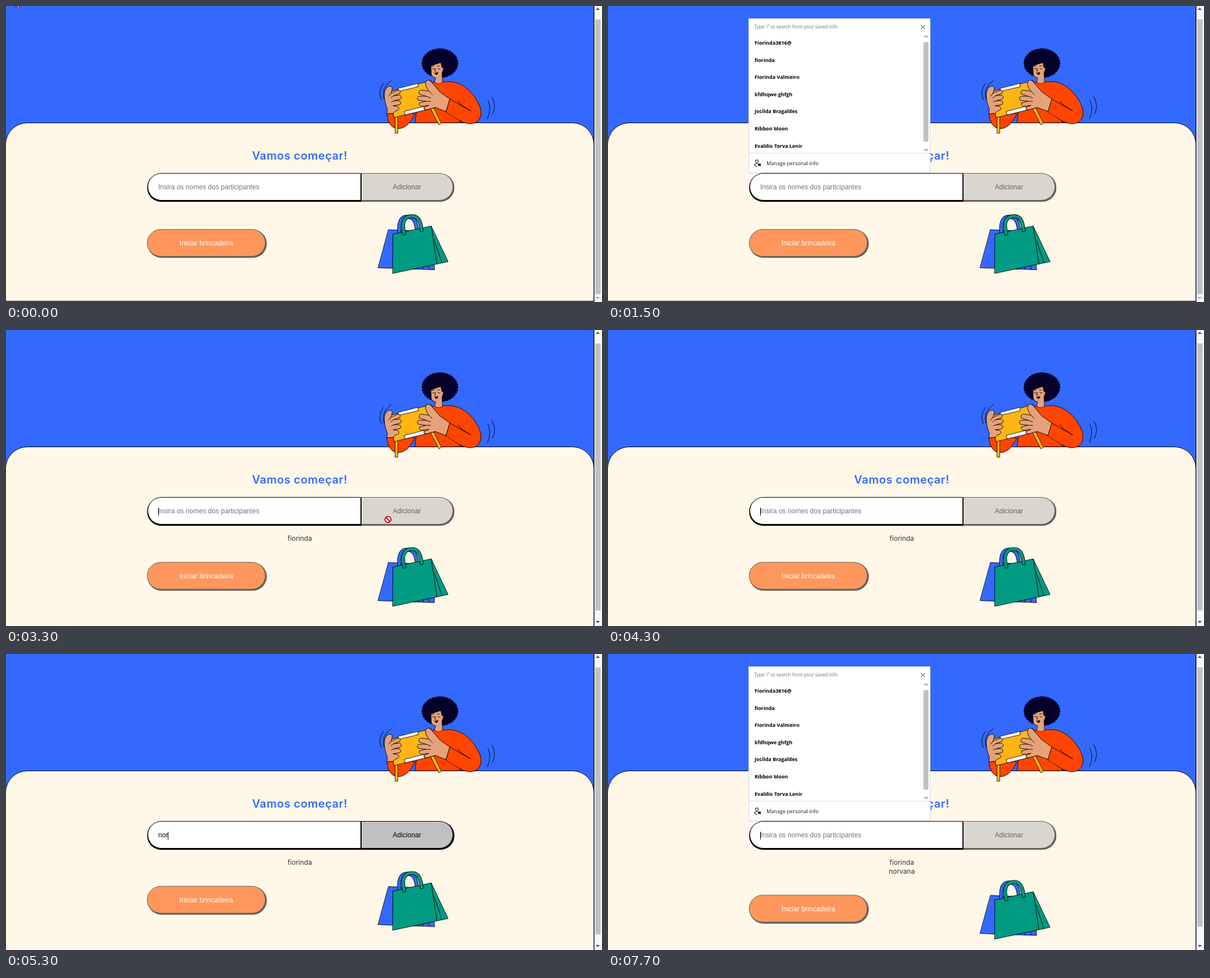
An HTML page for the animation above (8000 ms loop, 1061x528 px).

```html
<!DOCTYPE html>
<html lang="pt">
<head>
<meta charset="utf-8">
<style>
  html, body { margin: 0; width: 100%; height: 100%; overflow: hidden; }
  body { position: relative; font: 12.08px "Liberation Sans", Arial, sans-serif; }
  svg, div { position: absolute; box-sizing: border-box; }
  svg { left: 0; top: 0; }
  h1 { position: absolute; left: 0; top: 254.5px; width: 1046px; margin: 0; text-align: center;
       font: 600 20px/24px Inter, sans-serif; letter-spacing: .55px; color: #3469ff; }
  .field, .button { height: 49px; line-height: 48px; border: 1px solid #000; white-space: pre; }
  .field { left: 251.5px; top: 298px; width: 380.5px; padding-left: 18.5px; background: #fff;
           border-radius: 25px 0 0 25px; box-shadow: 0 1.5px 0 .8px #000; }
  .button { text-align: center; box-shadow: 1.5px 1.5px 0 .8px #000; }
  .off { opacity: .6; }
  #add { left: 632px; top: 298px; width: 163.5px; border-radius: 0 25px 25px 0; background: #c1c1c1; }
  #start { left: 251px; top: 398px; width: 211px; border-radius: 25px; background: #ff5800; color: #fff; }
  #caret { display: inline-block; width: 1px; height: 14px; margin-right: -1px; vertical-align: middle; background: #000; }
  #hint { color: #757575; }
  #names { left: 0; top: 363.5px; width: 1046px; text-align: center; white-space: pre;
           font: 12px/16px Inter, sans-serif; color: #333; }
  #popup { left: 250px; width: 324px; background: #fff; border: 1px solid #d3d7dd;
           font: 9.15px/20px "Open Sans", sans-serif; white-space: pre; color: #1b1b1b; }
  #popup div { left: 10px; }
  #popup .head { top: 4px; left: 9px; font-size: 8.4px; color: #707070; }
  #popup .item { font-size: 9px; font-weight: 700; color: #000; }
  #popup .foot { left: 0; bottom: 0; width: 322px; height: 35px; line-height: 35px; padding-left: 31px;
                 border-top: 1px solid #d3d7dd; background: #fff; }
</style>
</head>
<body>
<svg width="1061" height="528" fill="none" stroke="#000" stroke-linejoin="round" stroke-linecap="round">
  <rect width="1061" height="528" fill="#3469ff" stroke="none"/>
  <rect x="-.5" y="208.5" width="1047" height="600" rx="38" fill="#fff8e9"/>

  <g id="woman" stroke-width=".9">
    <path d="M672 138Q661 152 668 167M686 133Q667 146 673 166M858 168Q865 184 857 201M865 162Q874 178 866 193"/>
    <path fill="#ff4500" d="M728 208L733 170Q742 143 763 135Q771 140 778 135H794Q816 138 833 160Q849 182 845 197Q840 211 824 210Q816 209 808 205L810 208Z"/>
    <path d="M805 169L810 176L827 187M783 189L810 206"/>
    <path fill="#ff4500" d="M678 192Q680 216 696 219Q715 220 728 193L708 188Z"/>
    <g fill="#05012a" stroke="#05012a">
      <ellipse cx="772.500" cy="102" rx="30" ry="24"/>
      <ellipse cx="772.500" cy="102" rx="30" ry="24" stroke-width="5.500" stroke-dasharray="0 5"/>
    </g>
    <path fill="#e5a27a" stroke-width=".7" d="M757 107Q766 103 774 101L776 110Q780 109 778 114L776 120L777 136Q770 141 763 136L765 128Q757 127 757 120Z"/>
    <path stroke-width=".9" d="M759 112q2 1 4 0M769 112q2 1 4 0M759 108l3-1M768 107l4 0M765 111l-2 5h2"/>
    <path fill="#22051b" stroke-width=".5" d="M763 119q3 1 6-1q0 5-3.500 4.500q-2-1-2.500-3.500Z"/>
    <g fill="#ffb514" stroke-width=".8">
      <path d="M693 196h4.500v31h-4.500ZM756 183l5-2 14 28-4 3Z"/>
      <path d="M682 153L757 133L769 180L691 199Z"/>
    </g>
    <path fill="#f5f7ff" stroke-width=".8" d="M698 147L733 138L734 144L700 152ZM709 188L744 179L745 186L711 194Z"/>
    <g fill="#e5a27a" stroke-width=".9">
      <path d="M678 192L679 184Q672 168 674 153Q677 143 684 143Q689 144 687 150L685 156L698 150Q704 151 701 156L690 160L700 159Q706 161 702 166L691 169L700 169Q705 172 701 176L689 178L697 179Q702 183 697 186Q690 188 690 191Z"/>
      <path d="M790 166L772 153L756 134Q750 130 747 136Q746 143 753 152L739 150Q733 152 736 157L748 161L735 161Q730 164 734 168L747 170L736 173Q735 178 740 179L753 177L744 181Q744 186 750 185L764 181L783 188Z"/>
      <path d="M685 156L681 161M690 160L685 164M691 169L686 171M753 152L759 158M748 161L756 164M747 170L756 170"/>
    </g>
    <path fill="#ff4500" d="M790 166L783 189L808 204L820 185Z" stroke="none"/>
    <path d="M783 189L790 166L827 187"/>
  </g>

  <g id="bags" stroke-width=".9">
    <path fill="#3469ff" d="M681 399L757 402L763 470.500L662.500 467Z"/>
    <path d="M727 466v4M741 463l2 7M751 461l3 9"/>
    <g id="blueHandle"></g>
    <path fill="#009b82" d="M689 407L757 392.500L787 456L688.500 477Z"/>
    <path d="M757 392.500L767 460M762 416L776 458"/>
    <g id="greenHandle"></g>
  </g>

  <g id="pageEnd" stroke="none">
    <rect y="527" width="1046" height="40" fill="#fff"/>
    <rect y="526" width="1047" height="1.500" fill="#000"/>
  </g>
  <g stroke="none">
    <rect x="1046" width="1.500" height="528" fill="#000"/>
    <rect x="1047.500" width="14" height="528" fill="#f7f7f7"/>
    <rect id="thumb" x="1049" y="24" width="9.500" fill="#c1c1c1"/>
    <path fill="#505050" d="M1050 7l3.500-4 3.500 4Z"/>
    <path id="down" d="M1050 519l3.500 4 3.500-4Z"/>
  </g>
</svg>

<h1>Vamos começar!</h1>
<div class="field"><span id="typed"></span><i id="caret"></i><span id="hint">Insira os nomes dos participantes</span></div>
<div class="button" id="add">Adicionar</div>
<div id="names"></div>
<div class="button off" id="start">Iniciar brincadeira</div>

<div id="popup">
  <div class="head">Type '/' to search from your saved info</div>
  <svg width="322" height="276" fill="none" stroke="#222">
    <path d="M306 11l7 7M313 11l-7 7"/>
    <g id="scroll"><path d="M312 33l3-3 3 3M312 232l3 3 3-3"/><rect x="310.500" y="41" width="9" height="178" rx="3" fill="#c1c1c1" stroke="none"/></g>
  </svg>
  <div class="foot">Manage personal info
    <svg width="30" height="34" fill="none" stroke="#222" stroke-width="1.100">
      <circle cx="14" cy="14" r="2.500"/><path d="M17 18.500h-5.500q-2 0-1.500 2 1 2.500 5 2.500"/>
      <rect x="16.500" y="18" width="4.500" height="4.500" fill="#222" stroke="none"/>
    </svg>
  </div>
</div>

<svg width="1061" height="528" id="cursor" overflow="visible">
  <path id="arrow" fill="#fff" stroke="#000" stroke-width=".8" d="M0 0V12.500L3 9.800L5 14.300L7 13.500L5 9H9Z"/>
  <path id="hand" fill="#fff" stroke="#000" stroke-width=".8" d="M-1 0q1.500-1 2 1v4l6 1.500q1.500 1 1 4l-1 4h-6l-4-6q0-2 2-.5Z"/>
  <g id="blocked" fill="none"><circle r="5.500" fill="#fff" stroke="#fff" stroke-width="3"/>
    <path stroke="#d0021b" stroke-width="2" d="M-5.500 0a5.500 5.500 0 1 0 11 0a5.500 5.500 0 1 0 -11 0M-3.800-3.800L3.800 3.800"/></g>
</svg>

<script>
const $ = id => document.getElementById(id);
const LOOP = 8000, LINE = 15.8;

const entries = [
  { word: 'fiorinda', keys: [1600, 1700, 1900, 1900, 2200, 2200, 2400, 2500], sent: 3300 },
  { word: 'norvana', keys: [5000, 5100, 5300, 5400, 5600, 5600, 5700], sent: 6500 },
];
const saved = ['Fiorinda3816@', 'fiorinda', 'Fiorinda Valmeiro', 'kfdhqwe ghfgh',
  'Jocilda Bragaldes', 'Ribbon Moon', 'Evaldio Torva Lenir'];
const caretOn = [[1000, 1500], [1600, 3000], [3300, 3800], [4300, 4800], [5000, 6200], [6500, 7000], [7600, LOOP]];
const listAbove = [[1000, 1600], [4500, 5000], [7700, LOOP]];
const listBelow = [[1700, 3300]];
// Pointer moves: start time, x, y, end time, x, y
const moves = [
  [0, 17, -10, 200, 17, -10], [200, 17, -10, 800, 420, 325],
  [2900, 640, 354, 3100, 680, 338], [3100, 680, 338, 3400, 680, 338], [3400, 680, 338, 3600, 560, 325],
  [6200, 660, 330, 6300, 698, 321], [6300, 698, 321, 6700, 698, 321], [6700, 698, 321, 7100, 560, 318],
];

const within = (spans, t) => spans.some(([a, b]) => t >= a && t < b);
const show = (el, on) => el.style.display = on ? '' : 'none';
const shift = (id, y) => $(id).style.transform = `translateY(${y}px)`;

// A handle is a thick dark stroke with a thinner coloured one on top
function drawHandle(id, color, d) {
  $(id).innerHTML = `<path stroke-width="6.8" d="${d}"/><path stroke="${color}" stroke-width="5" d="${d}"/>`;
}
drawHandle('blueHandle', '#3469ff', 'M700 404C699 385 703 376 714 376C727 376 730 386 732 402');
drawHandle('greenHandle', '#009b82', 'M709 406C703 384 710 375 723 375C735 375 738 386 740 400');

const items = saved.map((name, i) => {
  const item = document.createElement('div');
  item.className = 'item';
  item.textContent = name;
  item.style.top = 33 + 30.6 * i + 'px';
  $('popup').append(item);
  return item;
});

function drawPopup(t) {
  const below = within(listBelow, t);
  show($('popup'), below || within(listAbove, t));
  $('popup').style.top = (below ? 348 : 22) + 'px';
  $('popup').style.height = (below ? 159 : 276) + 'px';
  items.forEach((item, i) => show(item, !below || i < 3));
  show($('scroll'), !below);
}

function drawCursor(t, enabled) {
  const move = moves.find(([a, , , b]) => t >= a && t < b);
  let kind = '';
  if (move) {
    const [a, x0, y0, b, x1, y1] = move, k = (t - a) / (b - a);
    const x = x0 + (x1 - x0) * k, y = y0 + (y1 - y0) * k;
    const inRow = y > 298 && y < 349;
    if (inRow && x > 632 && x < 797) kind = enabled ? 'hand' : 'blocked';
    else if (!(inRow && x > 251 && x < 633)) kind = 'arrow';
    $('cursor').style.transform = `translate(${x}px,${y}px)`;
  }
  for (const id of ['arrow', 'hand', 'blocked']) show($(id), id === kind);
}

function draw() {
  const t = Math.floor(performance.now() % LOOP / 100) * 100;
  const text = entries.map(e => t < e.sent ? e.word.slice(0, e.keys.filter(k => k <= t).length) : '').join('');
  const added = entries.filter(e => t >= e.sent).map(e => e.word);
  const offset = added.length * LINE;

  $('typed').textContent = text;
  $('caret').style.visibility = within(caretOn, t) ? 'visible' : 'hidden';
  show($('hint'), !text);
  $('add').classList.toggle('off', !text);
  $('names').textContent = added.join('\n');
  for (const id of ['start', 'bags', 'pageEnd']) shift(id, offset);
  $('thumb').setAttribute('height', 490 - 13.8 * added.length);
  $('down').setAttribute('fill', added.length ? '#505050' : '#a8a8a8');
  drawPopup(t);
  drawCursor(t, text);
  requestAnimationFrame(draw);
}
draw();
</script>
</body>
</html>
```
